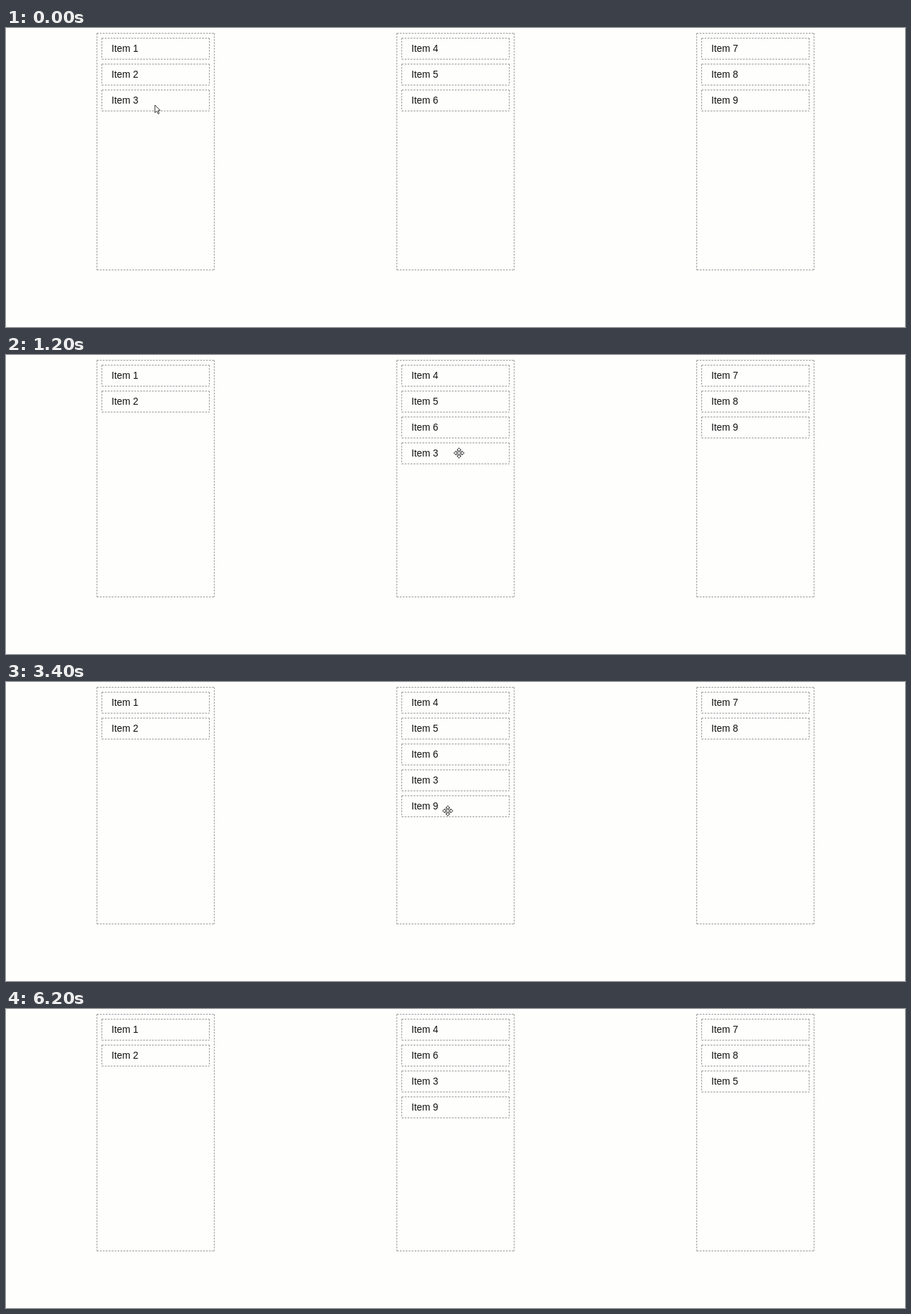
Recreate the animation shown at these times as an HTML page with a canvas. Size 1280 by 427 pixels, loop 6.8 s.

```html
<!DOCTYPE html>
<html lang="en">
<head>
<meta charset="utf-8">
<title>Drag and drop lists</title>
<style>
  html, body { margin: 0; height: 100%; overflow: hidden; background: #fefefd; }
  canvas { display: block; }
</style>
</head>
<body>
<canvas id="stage" width="1280" height="427"></canvas>
<script>
const ctx = document.getElementById('stage').getContext('2d');
const LOOP = 6800, STEP = 200;
const PAPER = '#fefefd', GREEN = '#8ce38d', LINE = '#959595', INK = '#111';
const COLUMN = { x: 129.5, y: 7.5, w: 167, h: 338, pitch: 427 };
const ITEM = { inset: 7, w: 153, h: 30, pitch: 37 };

// Where the pointer rests, in steps; it eases from one stop to the next
const stops = [
  { arrive: 0, leave: 0, x: 212, y: 110 },
  { arrive: 1, leave: 1, x: 186, y: 102 },
  { arrive: 3, leave: 3, x: 662, y: 158 },
  { arrive: 6, leave: 6, x: 645, y: 140 },
  { arrive: 12, leave: 12, x: 1070, y: 105 },
  { arrive: 16, leave: 17, x: 629, y: 184 },
  { arrive: 18, leave: 21, x: 588, y: 64 },
  { arrive: 23, leave: 23, x: 972, y: 120 },
  { arrive: 25, leave: 28, x: 1042, y: 97 },
  { arrive: 30, leave: 30, x: 1075, y: 386 }
];

const drags = [
  { item: 3, start: 1, drop: 5, column: 1, dx: 49, dy: 13 },
  { item: 9, start: 14, drop: 17, column: 1, dx: 80, dy: 16 },
  { item: 5, start: 20, drop: 28, column: 2, dx: 25, dy: 12 }
];

function pointerAt(step) {
  const i = stops.findIndex(stop => step <= stop.leave);
  if (i < 0) return null;
  const to = stops[i], from = stops[i - 1];
  if (step >= to.arrive) return to;
  const t = (step - from.leave) / (to.arrive - from.leave);
  const k = t * t * (3 - 2 * t);
  return { x: from.x + (to.x - from.x) * k, y: from.y + (to.y - from.y) * k };
}

function listsAt(step) {
  const lists = [[1, 2, 3], [4, 5, 6], [7, 8, 9]];
  for (const { item, drop, column } of drags) {
    if (step < drop) continue;
    const home = lists.find(list => list.includes(item));
    home.splice(home.indexOf(item), 1);
    lists[column].push(item);
  }
  return lists;
}

function line(x1, y1, x2, y2) {
  ctx.beginPath();
  ctx.moveTo(x1, y1);
  ctx.lineTo(x2, y2);
  ctx.stroke();
}

function box(x, y, w, h, fill) {
  ctx.fillStyle = fill;
  ctx.fillRect(x, y, w, h);
  ctx.strokeStyle = LINE;
  ctx.lineWidth = 1;
  ctx.setLineDash([2.5, 1.7]);
  for (const side of [0, 1]) {
    line(x, y + h * side, x + w, y + h * side);
    line(x + w * side, y, x + w * side, y + h);
  }
  ctx.setLineDash([]);
}

function drawItem(n, x, y) {
  box(x, y, ITEM.w, ITEM.h, PAPER);
  ctx.fillStyle = INK;
  ctx.font = '13.8px "Liberation Sans", Arial, sans-serif';
  ctx.fillText('Item ' + n, x + 13.7, y + 19.5);
}

function polygon(points) {
  ctx.beginPath();
  points.forEach(([x, y]) => ctx.lineTo(x, y));
  ctx.closePath();
  ctx.fill();
  ctx.stroke();
}

const cursors = {
  arrow() {
    polygon([[0, 0], [0, 11], [2.6, 8.7], [4.5, 12.6], [6.2, 11.9], [4.4, 8], [7.5, 7.7]]);
  },
  carry() {
    cursors.arrow();
    ctx.fillRect(1.5, 10.5, 7, 6);
    ctx.strokeRect(1.5, 10.5, 7, 6);
  },
  move() {
    const arm = [[-1, -1], [-1, -4], [-3, -4], [0, -7.4], [3, -4], [1, -4]];
    const turn = ([x, y]) => [-y, x];
    const arms = [arm];
    while (arms.length < 4) arms.push(arms.at(-1).map(turn));
    polygon(arms.flat());
  },
  blocked() {
    ctx.translate(9, 1);
    ctx.strokeStyle = '#111';
    ctx.lineWidth = 1.7;
    ctx.beginPath();
    ctx.arc(0, 0, 5.2, 0, 2 * Math.PI);
    ctx.fill();
    ctx.stroke();
    line(-3.7, -3.7, 3.7, 3.7);
  }
};

function drawCursor(kind, { x, y }) {
  ctx.save();
  ctx.translate(x, y);
  ctx.fillStyle = '#fff';
  ctx.strokeStyle = '#333';
  ctx.lineWidth = 1;
  cursors[kind]();
  ctx.restore();
}

function draw(step) {
  const pointer = pointerAt(step);
  const drag = drags.find(d => step >= d.start && step < d.drop);
  const hovers = (x, y, w, h) => pointer &&
    pointer.x >= x && pointer.x <= x + w && pointer.y >= y && pointer.y <= y + h;
  let kind = drag ? 'blocked' : 'arrow';

  ctx.fillStyle = PAPER;
  ctx.fillRect(0, 0, 1280, 427);

  listsAt(step).forEach((list, c) => {
    const left = COLUMN.x + c * COLUMN.pitch;
    const target = drag && hovers(left, COLUMN.y, COLUMN.w, COLUMN.h);
    if (target) kind = 'carry';
    box(left, COLUMN.y, COLUMN.w, COLUMN.h, target ? GREEN : PAPER);
    list.forEach((n, row) => {
      if (drag?.item === n) return;
      const x = left + ITEM.inset, y = COLUMN.y + ITEM.inset + row * ITEM.pitch;
      drawItem(n, x, y);
      if (!drag && step > 0 && hovers(x, y, ITEM.w, ITEM.h)) kind = 'move';
    });
  });

  if (drag) {
    ctx.globalAlpha = 0.75;
    drawItem(drag.item, Math.round(pointer.x - drag.dx) + 0.5, Math.round(pointer.y - drag.dy) + 0.5);
    ctx.globalAlpha = 1;
  }
  if (pointer) drawCursor(kind, pointer);
}

function tick() {
  draw(Math.floor(performance.now() % LOOP / STEP));
  requestAnimationFrame(tick);
}
tick();
</script>
</body>
</html>
```
